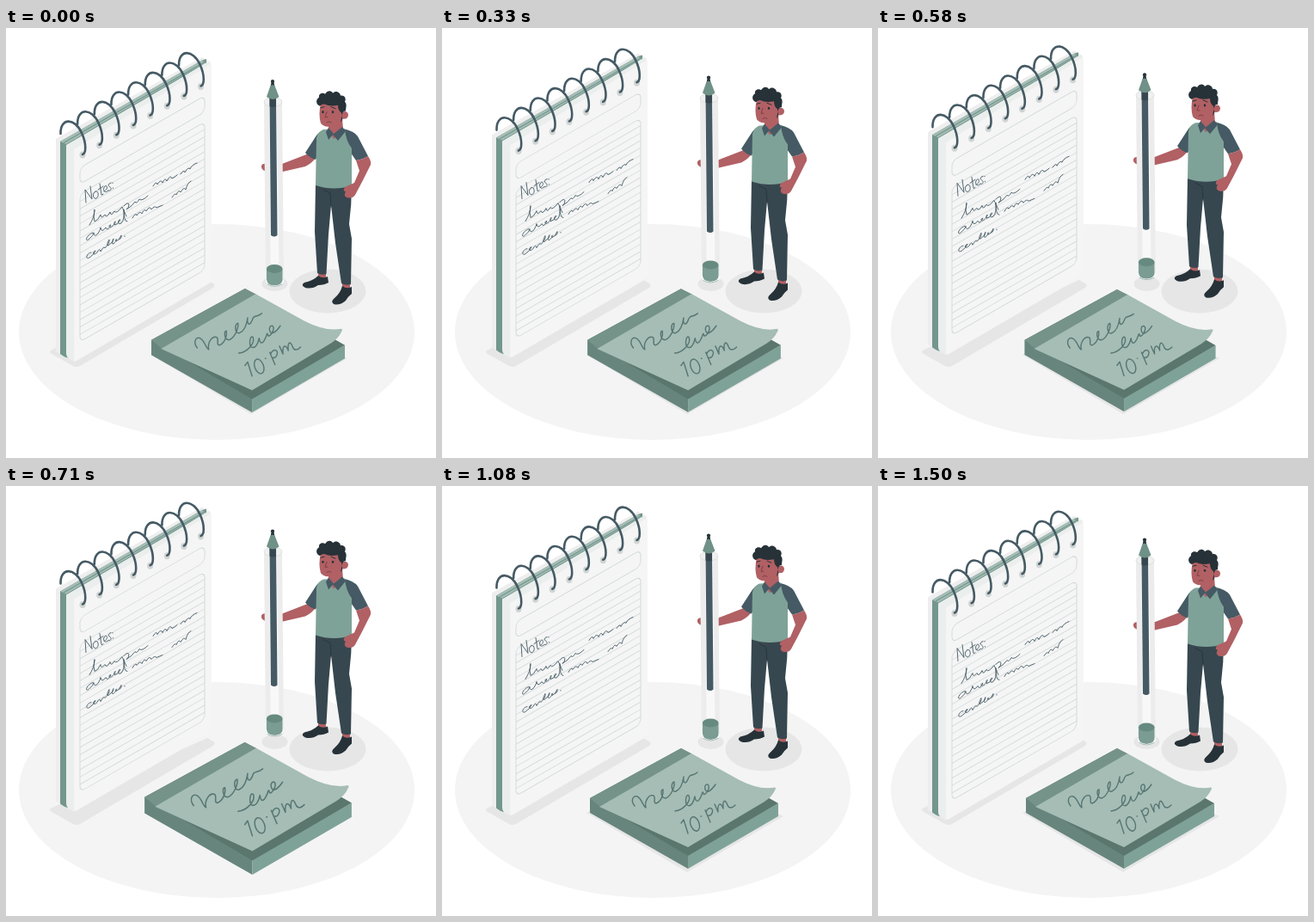
Recreate the animation shown at these times as an HTML page. Size 500 px wide and 500 px high, loop 1.54 s.

```html
<!DOCTYPE html>
<html lang="en">
<head>
<meta charset="utf-8">
<title>Notes</title>
<style>
  html, body { margin: 0; width: 100%; height: 100%; overflow: hidden; background: #fff; }
  svg { display: block; width: 100%; height: 100%; }
  .pen-line { fill: none; stroke-linecap: round; stroke-linejoin: round; }
  .skin { fill: #b16064; }
  .dark { fill: #263238; }
  .slate { fill: #455a64; }
</style>
</head>
<body>
<svg viewBox="0 0 500 500">
  <ellipse cx="245" cy="353.5" rx="230" ry="125.5" fill="#f4f4f4"/>
  <g fill="#e6e6e6">
    <path d="M52 375Q50 377 53 379L78 393Q82 395 86 393L241 302Q244 299 241 297L234 293 60 371Z"/>
    <ellipse cx="312.5" cy="297.5" rx="15" ry="8.5"/>
    <ellipse cx="374" cy="306" rx="44.5" ry="25.5"/>
    <path d="M168 380L285 449 397 384 380 376 180 374Z"/>
  </g>

  <g id="sticky">
    <path d="M172 363L286 429V445L172 380Z" fill="#67857d"/>
    <path d="M286 429L391 369V384L286 445Z" fill="#7fa298"/>
    <path d="M172 363L278 305 391 369 286 430Z" fill="#5a766d"/>
    <path d="M172 363L278 305 291 311.500 184 373Z" fill="#759389"/>
    <path d="M183 373L290 311 345 341.500Q369 354 387 350.500Q389 351 387 354Q384 361 375 367L286 420Z" fill="#a5bdb5"/>
    <g class="pen-line" stroke="#587673" stroke-width="1.400">
      <path d="M224 372C219 366 222 359 227 361C233 364 233 372 237 374C235 366 241 358 246 360C249 362 245 369 249 369C255 367 258 358 257 353C254 352 254 363 260 363C266 361 271 350 270 344C266 344 266 357 272 355C277 353 280 345 281 338C280 345 283 348 286 341C288 334 291 338 297 333"/>
      <path d="M271 378C280 377 290 367 287 360C284 357 282 367 285 371C290 374 293 366 294 361C295 368 298 369 302 359C303 354 304 356 304 358C306 361 313 350 309 347C304 346 305 357 310 355C314 353 316 350 318 347"/>
      <path d="M278 392L281 388 286 404M301 384L301.500 384M306 377L312 391M307 379C310 371 318 375 313 382Q311 384 310 383M317 370L321 379C320 369 324 367 327 375C326 366 329 363 332 371C334 376 338 374 341 371"/>
      <ellipse cx="294" cy="393" rx="5" ry="8.500" transform="rotate(-20 294 393)"/>
    </g>
  </g>

  <g id="floating">
    <g id="notebook">
      <path d="M58 129L63 126 228 34 238 40V296L79 388 58 376Z" fill="#eee"/>
      <path d="M63 132L228 37.500 233 40 75 138V383Q71 385 63 379Z" fill="#73968d"/>
      <path d="M63 132L228 37.500 232 40 70 135Z" fill="#a5bdb5"/>
      <path d="M67 133.500L231 39.500" stroke="#73968d" stroke-width="1.200"/>
      <path d="M228 37.500L233 36V41Z" fill="#73968d"/>
      <path d="M70 136L231 42 238 42 79 142V388L74 385Q70 383 70 378Z" fill="#eaeeec"/>
      <path d="M79 141L236 43Q239 41 239 44V292Q239 295 236 297L82 387Q79 388 79 386Z" fill="#f5f5f5"/>
      <g id="ruling" transform="matrix(1 -.577 0 1 86 0)" fill="none" stroke="#d0d9d7" stroke-width=".9">
        <rect y="162.500" width="145" height="19" rx="6"/>
        <rect y="193" width="145" height="172" rx="6"/>
      </g>
      <g class="pen-line" stroke="#455a64" stroke-width=".9">
        <path d="M93 203L92 188 100 199 98 184M104 190C100 191 101 200 105 198C109 196 107 188 104 190M109 181L111 194Q112 195 113 193M107 188L113 184M114 190C120 187 117 182 115 184C112 187 114 194 119 189M122 180C118 181 119 184 121 185C124 187 121 190 119 189M124 180V180.500M124.500 186V186.500"/>
        <path d="M97 229Q103 220 103 211Q101 220 103 225Q107 224 110 217Q110 223 115 217Q117 222 121 214Q122 220 126 213Q128 217 135 208L140 219M137 207Q141 202 143 205Q143 209 140 211Q147 207 150 202Q152 205 155 199Q158 202 165 195"/>
        <path d="M171 184Q175 177 176 182Q180 175 182 180Q185 173 187 178Q191 170 193 175Q196 174 199 171M203 170Q207 164 208 168Q212 161 214 164Q216 159 222 157"/>
        <path d="M101 238C94 240 91 249 96 246Q102 241 102 238Q102 244 107 239Q110 234 110 232Q111 239 116 232Q118 237 122 229C118 229 120 235 125 229C130 223 125 224 126 229Q130 229 133 223C130 222 129 230 134 227Q138 223 137 211Q137 226 141 225"/>
        <path d="M147 221Q151 214 152 218Q156 212 158 216Q161 209 163 213Q167 206 169 211Q173 206 175 209L182 206M193 197Q197 191 198 194Q201 187 203 191Q207 184 209 188Q211 180 215 178"/>
        <path d="M99 261C93 262 92 270 97 267Q103 263 104 259C100 260 101 266 106 261Q109 255 110 260Q114 253 115 256Q121 250 120 246Q116 253 119 253Q125 249 125 245Q122 252 125 251C131 245 127 244 128 248Q132 247 134 241Q135 244 132 246M138 242V242.500"/>
      </g>
      <g id="coils"></g>
    </g>

    <g id="man">
      <path class="skin" d="M352 146L321 158 305 159Q299 156 297 160Q296 165 303 167L322 167 348 161Q356 157 360 151Z"/>
      <path class="skin" d="M363 282H372V291H363ZM391 294H400V304H391Z"/>
      <path class="dark" d="M363 288Q368 292 374 289L375 296Q370 299 363 299Q356 304 348 302Q342 299 347 296Q357 294 363 288ZM391 300Q396 304 402 301L402 309Q398 312 395 317Q388 323 381 321Q377 318 382 314Q389 308 391 300Z"/>
      <path d="M360 181L402 181Q402 205 399 228L402 245 401 298Q395 300 390 297L383 250 378 206 375 240 372.500 286Q367 288 362 285L359 237Z" fill="#37474f"/>
      <path d="M378 208L377 192 369 188" class="pen-line" stroke="#263238" stroke-width=".8"/>
      <path class="slate" d="M369 119Q363 121 359 128L348 145Q353 151 360 153L367 138ZM392 117Q405 120 409 126L421 149Q415 153 407 154L398 141Z"/>
      <path d="M369 118L394 117Q395 131 402 140L402 183Q382 190 360 183L361 128Q363 120 369 118Z" fill="#7fa298"/>
      <path class="skin" d="M407 154Q415 153 421 149Q425 155 424 159L414 179 406 194Q403 199 396 197Q392 195 395 190Q391 190 394 185L405 180 411 166Z"/>
      <path class="skin" d="M375 110L391 104 392 119 381 129 375 119Z"/>
      <path class="slate" d="M375 116L372 121 375 130 381 123ZM391 115L395 120 386 131 380 124Z"/>
      <g transform="translate(0 .7)">
        <path class="skin" d="M366 87Q363 100 366 110Q371 116 380 113Q388 109 391 105Q398 106 398 100Q397 95 391 97L389 84Z"/>
        <path class="dark" d="M365 90C360 88 360 82 364 80C363 75 369 74 371 76C374 71 379 72 380 75C384 71 389 75 389 78C394 77 396 82 394 85C397 88 395 92 395 96Q391 95 390 104L389 109Q392 105 391 104L390 98Q386 95 386 89Q376 91 371 88Q368 87 365 90Z"/>
        <g class="dark">
          <ellipse cx="368.500" cy="97" rx="1.200" ry="1.600"/>
          <ellipse cx="380" cy="97" rx="1.200" ry="1.600"/>
        </g>
        <path class="pen-line" stroke="#263238" d="M366 92L370 91M378 91L383 93"/>
        <path class="pen-line" stroke="#813f47" d="M373 97L371 103 374 103M373 109Q376 107 378 109"/>
      </g>
    </g>

    <g id="pen">
      <path d="M300 86L302 297Q312 303 323 297L321 86Z" fill="#ececec"/>
      <path d="M306 86L307.500 276H317.500L315 86Z" fill="#f8f8f8"/>
      <ellipse cx="310.500" cy="86" rx="10.500" ry="5.500" fill="#f0f0f0" stroke="#d9dcdb" stroke-width=".8"/>
      <path class="slate" d="M306.500 80H314L315.500 241Q312 244 308 241Z"/>
      <path d="M306.500 80H314V91Q310 93 306.600 91Z" fill="#37474f"/>
      <path class="dark" d="M308.500 63H311.500L312.500 69H307.500Z"/>
      <circle class="dark" cx="310" cy="62" r="2.100"/>
      <path d="M307.500 67Q310 65.500 312.500 67L317.500 80Q310.500 86 303 80Z" fill="#6f9187"/>
      <path d="M303 280V294Q304 299 312 299.500Q320 299 321.500 294V280Z" fill="#7a9c92"/>
      <ellipse cx="312.200" cy="280" rx="9.300" ry="5" fill="#668a7f"/>
      <path d="M302.500 293Q303 300 312.500 300Q322 300 322.500 293" class="pen-line" stroke="#fff" stroke-width="1.200"/>
      <path d="M304 298Q312 303 321 298" class="pen-line" stroke="#8fa9a2" stroke-width=".8"/>
    </g>
  </g>
</svg>
<script>
const $ = id => document.getElementById(id);
const repeat = (count, draw) => Array.from({ length: count }, (_, i) => draw(i)).join('');

$('ruling').innerHTML += repeat(19, i => `<path d="M0 ${193 + 8.6 * (i + 1)}h145"/>`);

$('coils').innerHTML = repeat(8, i => `<g transform="translate(${19.65 * i} ${-11.35 * i})">
  <ellipse cx="89" cy="147.500" rx="3.500" ry="4" fill="#cfd4d3"/>
  <path class="pen-line" stroke="#455a64" stroke-width="2.600"
    d="M63.500 123C63 104 80 104 88 122C94 135 93 146 89 147"/></g>`);

const LOOP = 1540, CYCLE = 1500, LEAD = 40, RISE = 10, START_RISE = 0.53;

// Linear rise and fall, peaking halfway through the cycle.
const floatHeight = p => RISE * (1 - Math.abs(2 * p - 1));

// Two beats, each swelling linearly to 1.1 and back.
function heartbeat(p) {
  const beat = (start, peak, end) =>
    Math.max(0, Math.min((p - start) / (peak - start), (end - p) / (end - peak)));
  return 1 + 0.1 * (beat(0, 0.1, 0.3) + beat(0.4, 0.5, 0.6));
}

function render(now) {
  const phase = Math.min(1, (now % LOOP + LEAD) / CYCLE);
  $('floating').setAttribute('transform', `translate(0 ${START_RISE - floatHeight(phase)})`);
  $('sticky').setAttribute('transform',
    `translate(281.5 375) scale(${heartbeat(phase)}) translate(-281.5 -375)`);
  requestAnimationFrame(render);
}
render(0);
</script>
</body>
</html>
```
